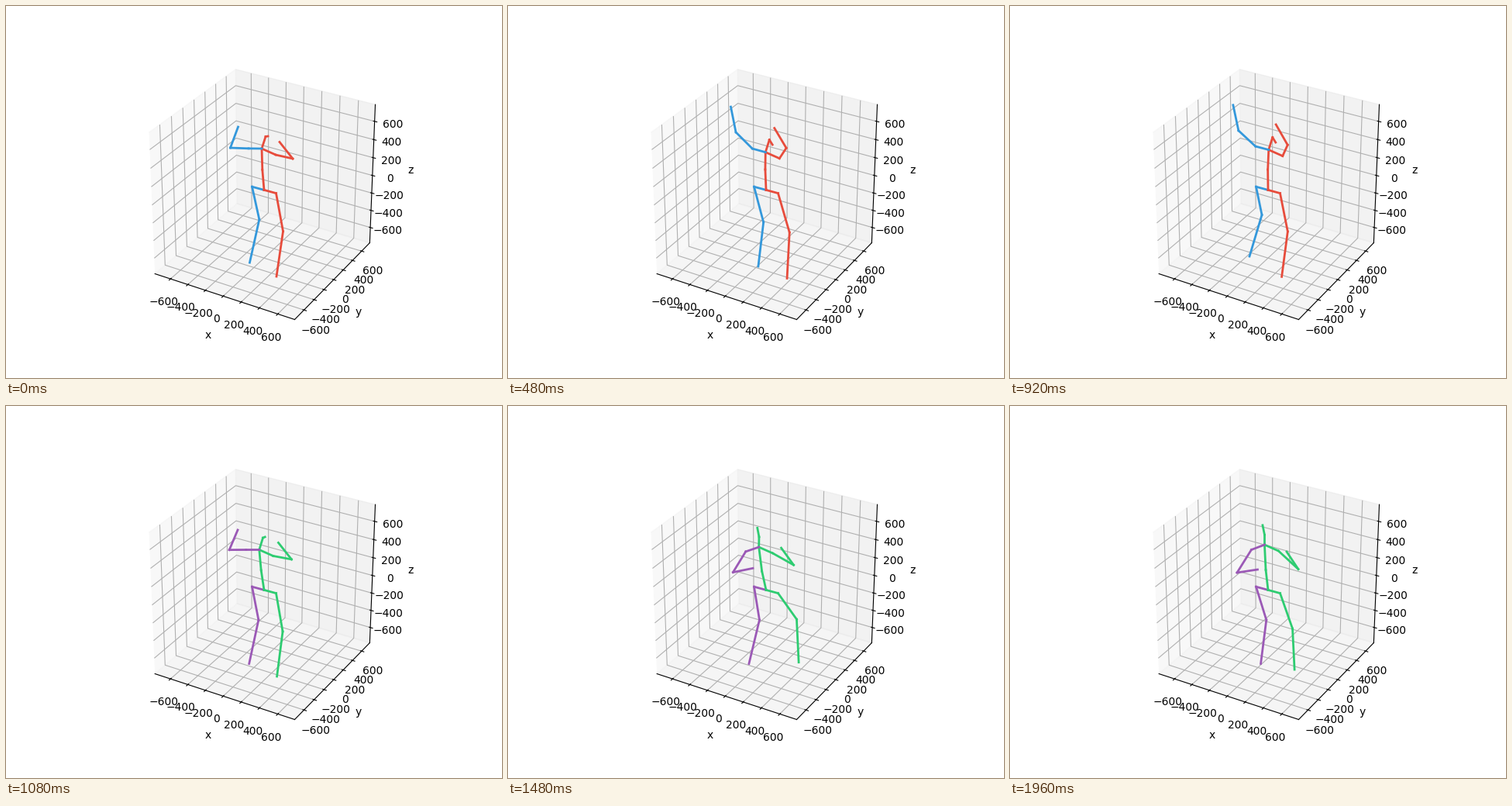
Recreate the animation shown at these times as a matplotlib script. Size 640x480 px, loop 2000 ms.

```python
import numpy as np
import matplotlib.pyplot as plt
from matplotlib.animation import FuncAnimation

W, H, DPI = 640, 480, 100
FRAMES, STEP = 50, 40
SWITCH = 1000  # ms at which the predicted motion takes over
STRIDE = 1100  # ms per step cycle

HIP = np.array([333, 237.4])
PELVIS = np.array([15.5, 4.2])

# Upper body: chest, neck, head, left elbow and hand, right elbow and hand.
START = np.array([(330, 184), (335, 168.5), (338, 168),
                  (370, 197), (353, 175.5), (289.5, 183), (299.5, 156)])
RAISED = np.array([(334, 185), (339, 169), (343, 175.5),
                   (358, 178.5), (343, 152), (295, 160.5), (288, 127.5)])
LOWERED = np.array([(328.5, 179), (328.5, 166), (326, 153.8),
                    (372, 210.5), (357, 188), (293, 215), (319.5, 211)])
IS_LEFT_ARM = np.array([0, 0, 0, 1, 1, 0, 0])[:, None]
SWAY_SHARE = np.array([1, 1, 1, 0.5, 0.5, 0.5, 0.5])[:, None]


def swing(t, peak):
    return np.cos(np.pi * (t - peak) / STRIDE) ** 2


def smooth(t, begin, end):
    u = np.clip((t - begin) / (end - begin), 0, 1)
    return u * u * (3 - 2 * u)


def settle(t, tau):
    return 1 - np.exp(-t / tau)


def upper_body(goal, main, left_arm, sway):
    """Move from START to goal, the left arm on its own timing."""
    ease = np.where(IS_LEFT_ARM, left_arm, main)
    pose = START + ease * (goal - START) + SWAY_SHARE * sway
    chest, neck, head, l_elbow, l_hand, r_elbow, r_hand = pose
    lean = chest[0] - HIP[0]
    spine = (HIP[0] + lean / 2 - 0.7, 211 + lean ** 2 / 40)
    l_shoulder = chest + (18, 8)
    r_shoulder = chest + (-17, 0.18 * (r_elbow - chest)[1])
    return ([HIP, spine, chest, neck, head],
            [chest, l_shoulder, l_elbow, l_hand],
            [chest, r_shoulder, r_elbow, r_hand])


def observed(t):
    back, forth = swing(t, 930) ** 2, swing(t, 590) ** 2
    r_leg = [(329.7 - 4.7 * back, 279 - 9.5 * back ** 2),
             (323 - 14 * back, 336 - 13 * back ** 2)]
    l_leg = [(357.5 + 7 * forth, 290.8 + 1.7 * forth),
             (349 + 13.5 * forth, 349 + 3 * forth)]
    sway = forth * np.array([-2, 4.5])
    return r_leg, l_leg, upper_body(RAISED, settle(t, 130), settle(t, 260), sway)


def predicted(t):
    back, lift = swing(t, 310), swing(t, 645)
    ease = smooth(t, 0, 560)
    r_leg = [(331.5 - 9 * back, 276), (325 - 18 * back, 332.5)]
    l_leg = [(357 + 19.5 * lift, 291 - 25 * lift ** 2),
             (349 + 10 * ease + 21 * lift, 349 - 23 * lift)]
    sway = back ** 2 * np.array([-8, 4.5])
    return r_leg, l_leg, upper_body(LOWERED, ease, smooth(t, 280, 680), sway)


def bones(motion, t):
    """Return every bone as a pair of points, with True for the right side."""
    r_leg, l_leg, (trunk, l_arm, r_arm) = motion(t)
    chains = [([HIP, HIP - PELVIS, *r_leg], True),
              ([HIP, HIP + PELVIS, *l_leg], False),
              (trunk, False), (l_arm, False), (r_arm, True)]
    return [(pair, right) for chain, right in chains
            for pair in zip(chain, chain[1:])]


fig = plt.figure(figsize=(W / DPI, H / DPI), dpi=DPI)
box = fig.add_subplot(projection="3d")
reach = 750 * 25 / 24
box.set(xlim=(-reach, reach), ylim=(-reach, reach), zlim=(-reach, reach),
        xlabel="x", ylabel="y", zlabel="z")
box.set_box_aspect((1, 1, 1), zoom=0.94675)
box.view_init(elev=30, azim=-60)

# The figure is drawn on a flat layer measured in pixels.
layer = fig.add_axes([0, 0, 1, 1])
layer.set(xlim=(0, W), ylim=(H, 0))
layer.axis("off")
lines = [layer.plot([], [], lw=2)[0] for _ in bones(observed, 0)]


def draw(frame):
    t = frame * STEP
    if t < SWITCH:
        parts, colors = bones(observed, t), ("#e74c3c", "#3498db")
    else:
        parts, colors = bones(predicted, t - SWITCH), ("#2ecc71", "#9b59b6")
    for line, (pair, right) in zip(lines, parts):
        line.set_data(*np.transpose(pair))
        line.set_color(colors[right])
    return lines


anim = FuncAnimation(fig, draw, frames=FRAMES, interval=STEP, repeat=True, repeat_delay=0)
plt.show()
```
